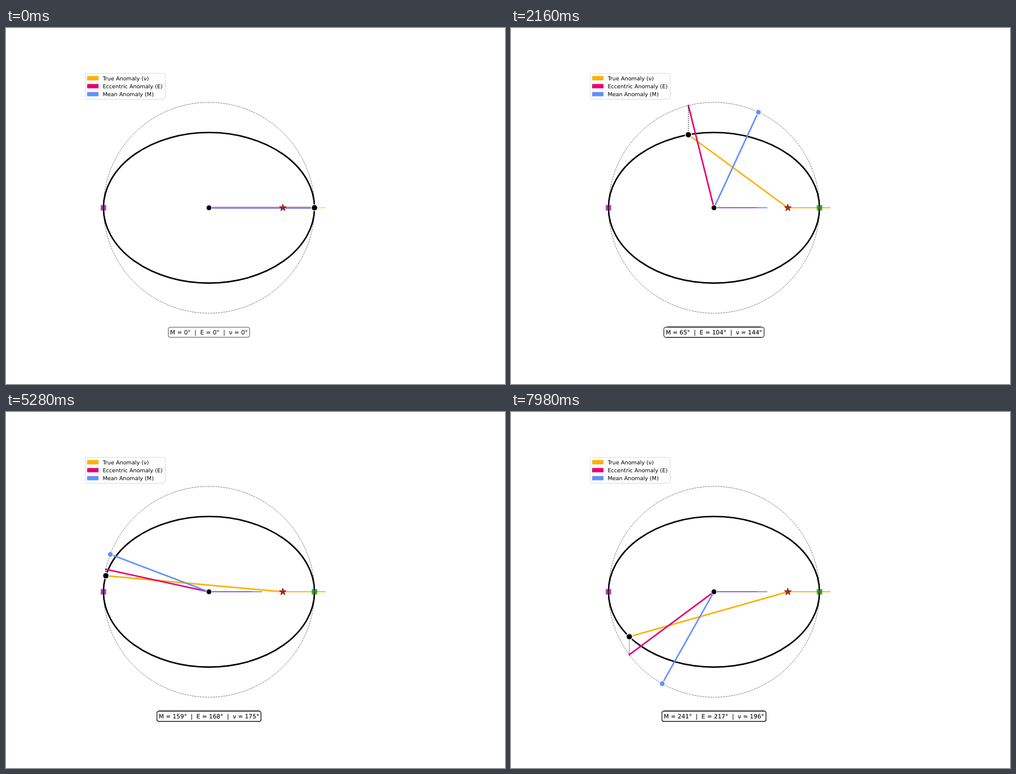
Write an HTML page with a canvas that moves like this. It is 885 px wide and 632 px high and loops after 8000 ms.

```html
<!DOCTYPE html>
<html lang="en">
<head>
<meta charset="utf-8">
<title>Orbital anomalies</title>
<style>
  html, body { margin: 0; width: 100%; height: 100%; overflow: hidden; background: #fff; }
  canvas { display: block; }
</style>
</head>
<body>
<canvas id="stage" width="885" height="632"></canvas>
<script>
const ctx = document.getElementById('stage').getContext('2d');
const LOOP = 8000, STEP = 60, STEPS_PER_ORBIT = 199;
const PT = 0.8778;                       // one typographic point in stage pixels
const CX = 359.98, CY = 319.16, A = 187.15, ECC = 0.7;
const B = A * Math.sqrt(1 - ECC * ECC);
const FOCUS = CX + A * ECC;
const ORANGE = [255, 176, 0], PINK = [230, 0, 115], BLUE = [100, 143, 255];
const REF_ALPHA = 0.5;
const TAU = 2 * Math.PI;

const rgb = c => `rgb(${c.map(Math.round).join()})`;
const mix = (from, to, k) => from.map((v, i) => v + (to[i] - v) * k);
const setFont = points => { ctx.font = `${points * PT}px "DejaVu Sans", sans-serif`; };

function line(x1, y1, x2, y2, color, width, dash = []) {
  ctx.beginPath();
  ctx.moveTo(x1, y1);
  ctx.lineTo(x2, y2);
  ctx.strokeStyle = color;
  ctx.lineWidth = width * PT;
  ctx.lineCap = dash.length ? 'butt' : 'square';
  ctx.setLineDash(dash.map(d => d * width * PT));
  ctx.stroke();
  ctx.setLineDash([]);
}

function oval(rx, ry, color, width, dash = []) {
  ctx.beginPath();
  ctx.ellipse(CX, CY, rx, ry, 0, 0, -TAU, true);
  ctx.strokeStyle = color;
  ctx.lineWidth = width * PT;
  ctx.lineCap = 'butt';
  ctx.setLineDash(dash.map(d => d * width * PT));
  ctx.stroke();
  ctx.setLineDash([]);
}

function disc(x, y, r, color) {
  ctx.beginPath();
  ctx.arc(x, y, r, 0, TAU);
  ctx.fillStyle = color;
  ctx.fill();
}

function dot(x, y, r, ring, color) {
  disc(x, y, r + ring, '#fff');
  disc(x, y, r, color);
}

function square(x, color) {
  const size = 11 * PT;
  ctx.fillStyle = color;
  ctx.fillRect(x - size / 2, CY - size / 2, size, size);
}

function star(x, y, r) {
  ctx.beginPath();
  for (let i = 0; i < 10; i++) {
    const angle = -Math.PI / 2 + i * Math.PI / 5;
    const d = i % 2 ? r * 0.382 : r;
    ctx.lineTo(x + d * Math.cos(angle), y + d * Math.sin(angle));
  }
  ctx.closePath();
  ctx.fillStyle = '#f00';
  ctx.fill();
  ctx.strokeStyle = '#000';
  ctx.lineWidth = 0.6;
  ctx.stroke();
}

function roundBox(x, y, w, h, r, fill, stroke) {
  ctx.beginPath();
  ctx.roundRect(x, y, w, h, r);
  ctx.fillStyle = fill;
  ctx.fill();
  ctx.strokeStyle = stroke;
  ctx.lineWidth = PT;
  ctx.stroke();
}

function legend() {
  roundBox(140.5, 80.67, 141.8, 46, 1.9, '#fff', '#d6d6d6');
  setFont(11);
  ctx.textAlign = 'left';
  [['True Anomaly (ν)', ORANGE], ['Eccentric Anomaly (E)', PINK], ['Mean Anomaly (M)', BLUE]]
    .forEach(([label, color], i) => {
      const base = 92.5 + i * 14.15;
      ctx.fillStyle = rgb(color);
      ctx.fillRect(143.9, base - 7.2, 20.2, 7.64);
      ctx.fillStyle = '#000';
      ctx.fillText(label, 171.4, base);
    });
}

function anomalies(step) {
  const M = step * TAU / STEPS_PER_ORBIT;
  let E = M + ECC * Math.sin(M);
  for (let i = 0; i < 12; i++) E -= (E - ECC * Math.sin(E) - M) / (1 - ECC * Math.cos(E));
  const nu = 2 * Math.atan2(Math.sqrt(1 + ECC) * Math.sin(E / 2), Math.sqrt(1 - ECC) * Math.cos(E / 2));
  return { M, E, nu };
}

// The translucent reference lines pile up, one layer per step.
function references(step) {
  let orange = [255, 255, 255], both = orange, blue = orange;
  for (let i = 0; i <= step; i++) {
    orange = mix(orange, ORANGE, REF_ALPHA);
    blue = mix(blue, BLUE, REF_ALPHA);
    both = mix(mix(both, PINK, REF_ALPHA), BLUE, REF_ALPHA);
  }
  line(FOCUS, CY, FOCUS + 0.4 * A, CY, rgb(orange), 2);
  line(CX, CY, CX + 0.5 * A, CY, rgb(blue), 2);
  line(CX, CY, CX + 0.4 * A, CY, rgb(both), 2);
}

// Each readout is laid over the earlier ones.
function readouts(step) {
  setFont(12);
  ctx.textAlign = 'center';
  for (let i = 0; i <= step; i++) {
    const { M, E, nu } = anomalies(i);
    const [m, e, v] = [M, E, nu].map(a => Math.round(a * 360 / TAU));
    const text = `M = ${m}°  |  E = ${e}°  |  ν = ${v}°`;
    const w = ctx.measureText(text).width + 6.32;
    roundBox(CX - w / 2, 531.2, w, 17.9, 3.16, 'rgba(255,255,255,.8)', 'rgba(0,0,0,.8)');
    ctx.fillStyle = '#000';
    ctx.fillText(text, CX, 543.74);
  }
}

function draw(step) {
  const { M, E } = anomalies(step);
  const px = CX + A * Math.cos(E), py = CY - B * Math.sin(E);
  const ey = CY - A * Math.sin(E);
  const mx = CX + A * Math.cos(M), my = CY - A * Math.sin(M);

  ctx.fillStyle = '#fff';
  ctx.fillRect(0, 0, 885, 632);
  ctx.textRendering = 'geometricPrecision';

  oval(A, A, '#666', 1, [3.7, 1.6]);
  oval(A, B, '#000', 3);
  references(step);
  line(FOCUS, CY, px, py, rgb(ORANGE), 3);
  line(CX, CY, px, ey, rgb(PINK), 3);
  line(CX, CY, mx, my, rgb(BLUE), 3);
  line(px, py, px, ey, '#000', 1.5, [1, 1.65]);

  square(CX + A, 'rgba(0,128,0,.7)');
  square(CX - A, 'rgba(128,0,128,.7)');
  dot(CX, CY, 4.3, 1.1, '#000');
  star(FOCUS, CY, 6.58);
  dot(mx, my, 4.2, 1.3, rgb(BLUE));
  dot(px, py, 4.8, 1.4, '#000');
  legend();
  readouts(step);
}

const start = performance.now();
let shown = -1;
function tick() {
  const step = Math.floor((performance.now() - start) % LOOP / STEP);
  if (step !== shown) draw(shown = step);
  requestAnimationFrame(tick);
}
tick();
</script>
</body>
</html>
```
